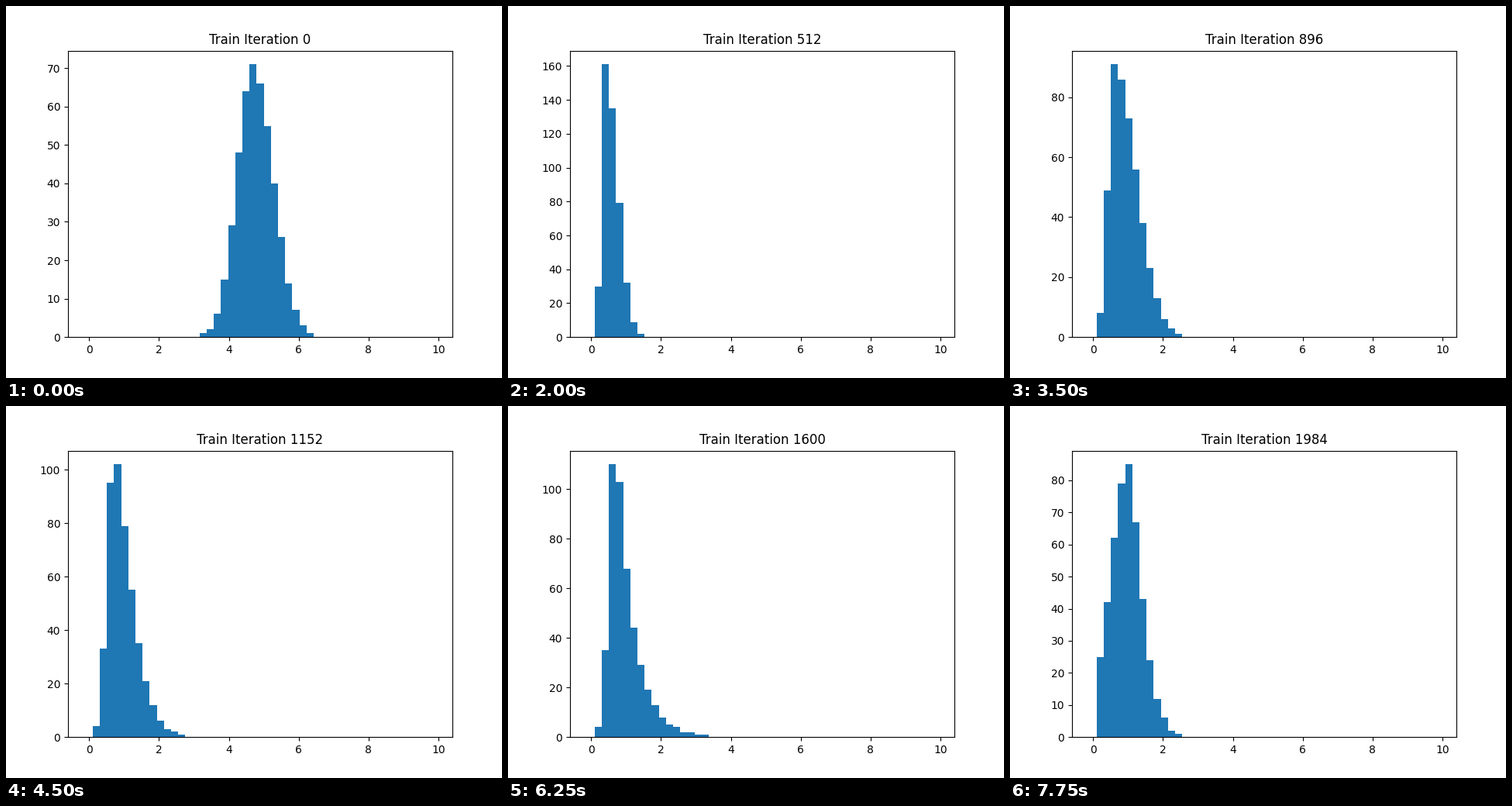
Write a matplotlib script that moves like this. It is 640 px wide and 480 px high and loops after 8 s.

```python
import numpy as np
import matplotlib.pyplot as plt
from matplotlib.animation import FuncAnimation

FRAMES = 32
STEP = 64
SAMPLES = 448
DROP = 4  # steps of the fast fall at the start
BINS = np.linspace(0, 10, 50)
WIDTH = BINS[1] - BINS[0]

# step, mode, left width, right width, power of the right tail (widths in bins)
POSES = np.array([
    (0, 23, 3.18, 3.96, 2),
    (4, 2, 2.97, 4.45, 2),
    (8, 2, 0.77, 2.37, 2),
    (14, 3, 1.27, 4.28, 2),
    (22, 4, 1.48, 2.18, 1),
    (28, 3, 1.16, 2.58, 1),
    (31, 5, 3.60, 2.56, 1.5),
]).T


def pose(step):
    """Shape of the distribution, easing out of the first drop."""
    if step < DROP:
        step = DROP * (1 - (1 - step / DROP) ** 2)
    return [np.interp(step, POSES[0], row) for row in POSES[1:]]


def histogram(step):
    mode, left, right, power = pose(step)
    k = np.arange(len(BINS) - 1)
    d = np.abs(k - mode)
    shape = np.where(k < mode, np.exp(-(d / left) ** 2),
                     np.exp(-(d / right) ** power))
    shape[0] = 0
    return np.rint(SAMPLES * shape / shape.sum())


fig, ax = plt.subplots(figsize=(6.4, 4.8), dpi=100)


def update(i):
    ax.clear()
    ax.bar(BINS[:-1], histogram(i), width=WIDTH)
    ax.set_title(f"Train Iteration {i * STEP}")


anim = FuncAnimation(fig, update, frames=FRAMES, init_func=lambda: None,
                     interval=250, repeat=True, repeat_delay=0)
plt.show()
```
